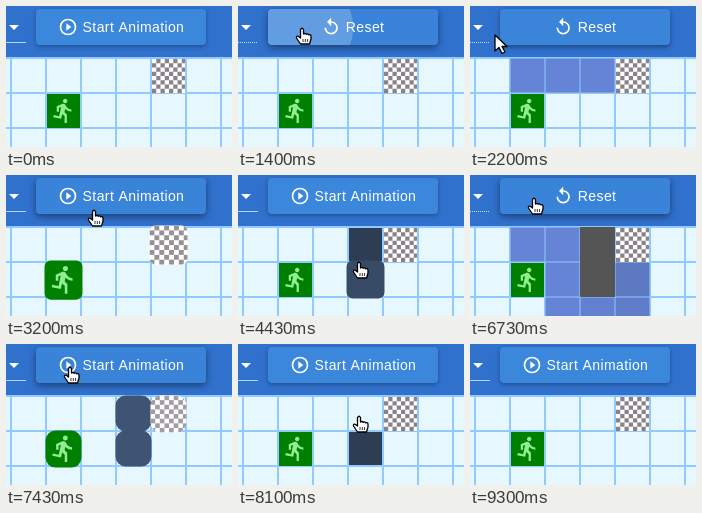
Write an HTML page with a canvas that moves like this. It is 226 px wide and 141 px high and loops after 9.56 s.

```html
<!DOCTYPE html>
<html lang="en">
<head>
<meta charset="utf-8">
<title>Pathfinding grid</title>
<style>
  html, body { margin: 0; width: 100%; height: 100%; overflow: hidden; background: #e6f8fd; }
  canvas { display: block; width: 226px; height: 141px; }
</style>
</head>
<body>
<canvas></canvas>
<script>
const WIDTH = 226, HEIGHT = 141, LOOP = 9560, CELL = 35;
const canvas = document.querySelector('canvas');
const ctx = canvas.getContext('2d');
const ratio = window.devicePixelRatio || 1;
canvas.width = WIDTH * ratio;
canvas.height = HEIGHT * ratio;

const BUTTON = { x: 30, y: 3, w: 170, h: 36 };
const CLICKS = [1340, 2656, 5410, 7078];
const RESETS = [2656, 7078];
const RUNS = [
  { start: 1480, end: 2656, cells: [[1, 0], [2, 0], [3, 0]] },
  { start: 5985, end: 7078, cells: [[1, 0], [2, 0], [2, 1], [2, 2], [3, 2], [4, 2], [4, 1]] },
];
const WALLS = [
  { row: 0, born: 3770, gone: 7930, grow: 360 },
  { row: 1, born: 4230, gone: 8150, grow: 300 },
];
// Pointer stops: time, x, y
const POINTER = [
  [300, -8, 26], [700, 64, 22], [1850, 64, 22], [2200, 25, 29], [2270, 24, 30],
  [2600, 88, 25], [2750, 88, 25], [3200, 88, 35], [3270, 88, 36], [3720, 121, 60],
  [4230, 121, 60], [4400, 121, 87], [4430, 121, 87], [4530, 118, 63], [4670, 118, 63],
  [5070, 64, 23], [7500, 64, 23], [7900, 121, 72], [8100, 121, 72], [8200, 121, 95],
  [8400, 121, 95], [8800, 115, 18], [9100, 115, 18],
];

const icons = {
  play: new Path2D('M10 16.5l6-4.5-6-4.5z'),
  replay: new Path2D('M12 5V1L7 6l5 5V7c3.31 0 6 2.69 6 6s-2.69 6-6 6-6-2.69-6-6H4c0 4.42 3.58 8 8 8s8-3.58 8-8-3.58-8-8-8z'),
  runner: new Path2D('M13.5 5.5c1.1 0 2-.9 2-2s-.9-2-2-2-2 .9-2 2 .9 2 2 2zm-3.6 13.9l1-4.4 2.1 2v6h2v-7.5l-2.1-2 .6-3c1.3 1.5 3.3 2.5 5.5 2.5v-2c-1.9 0-3.5-1-4.3-2.4l-1-1.6c-.4-.6-1-1-1.7-1-.3 0-.5.1-.8.1L6 8.3V13h2V9.6l1.8-.7-1.6 8.1-4.9-1-.4 2z'),
  hand: new Path2D('M-1.5 1.5Q0-1 1.5 1.5V6Q3 4.8 4.2 6.2 5.5 5.2 6.7 6.8 9 6 9 8.5V11L7.5 16H-1.5L-5.5 10Q-6 7.5-3.5 8.5L-1.5 10Z'),
  arrow: new Path2D('M0 0V16L4 12.5 7 18.5 10 17 7 11.5H12Z'),
};

const clamp = v => Math.max(0, Math.min(1, v));
const mix = (a, b, p) => a + (b - a) * p;
const smooth = p => p * p * (3 - 2 * p);
const easeOut = p => 1 - (1 - p) ** 2;
const blend = (a, b, p) => `rgb(${a.map((v, i) => Math.round(mix(v, b[i], p)))})`;

function rect(x, y, w, h, color) {
  ctx.fillStyle = color;
  ctx.fillRect(x, y, w, h);
}

function rounded(x, y, w, h, radius) {
  ctx.beginPath();
  ctx.roundRect(x, y, w, h, radius);
}

function at(x, y, scale, draw) {
  ctx.save();
  ctx.translate(x, y);
  ctx.scale(scale, scale);
  draw();
  ctx.restore();
}

const inCell = (col, row, scale, draw) =>
  at(5 + CELL * (col + .5), 52 + CELL * (row + .5), scale, draw);

// Pop from small and round to a slightly oversized square, then settle.
function pop(p) {
  const scale = p < .6 ? mix(.3, 1.15, easeOut(p / .6))
    : p < .72 ? 1.15 : mix(1.15, 1, (p - .72) / .28);
  return { p, scale, radius: 16.5 * (1 - p) };
}

const lastReset = t => Math.max(-LOOP, ...RESETS.filter(r => r <= t));
const resetPop = t => pop(clamp((t - lastReset(t)) / 800));

function pointerAt(t) {
  const next = POINTER.findIndex(stop => stop[0] > t);
  if (next < 1) return null;
  const [t0, x0, y0] = POINTER[next - 1], [t1, x1, y1] = POINTER[next];
  const p = smooth((t - t0) / (t1 - t0));
  return { x: mix(x0, x1, p), y: mix(y0, y1, p) };
}

const overButton = p => !!p && p.x >= BUTTON.x && p.x <= BUTTON.x + BUTTON.w
  && p.y >= BUTTON.y && p.y <= BUTTON.y + BUTTON.h;

// Average of recent pointer positions gives a 200 ms hover fade.
function hoverAt(t) {
  let hits = 0;
  for (let i = 0; i < 10; i++) hits += overButton(pointerAt(t - i * 20));
  return hits / 10;
}

function drawGrid() {
  rect(0, 51, WIDTH, HEIGHT, '#e6f8fd');
  for (let x = 4; x < WIDTH; x += CELL) rect(x, 51, 2, HEIGHT, '#92caff');
  for (let y = 51; y < HEIGHT; y += CELL) rect(0, y, WIDTH, 2, '#92caff');
}

function drawRun(t, run) {
  if (t < run.start || t >= run.end) return;
  run.cells.forEach(([col, row], i) => {
    const age = t - run.start - i * 30;
    if (age <= 0) return;
    const grow = clamp(age / 350);
    inCell(col, row, grow, () => {
      rounded(-17, -17, 34, 34, 12 * (1 - grow));
      ctx.fillStyle = blend([70, 92, 142], [102, 132, 214], clamp((age - 350) / 300));
      ctx.fill();
    });
  });
}

function drawWall(t, wall, running) {
  if (t < wall.born || t >= wall.gone) return;
  const reset = lastReset(t);
  const { p, scale, radius } = reset > wall.born
    ? resetPop(t) : pop(clamp((t - wall.born) / wall.grow));
  inCell(3, wall.row, running ? 1 : scale, () => {
    const size = running ? 35 : 33;
    rounded(-size / 2, -size / 2, size, size, running ? 0 : radius);
    ctx.fillStyle = running ? '#555' : blend([78, 102, 138], [45, 61, 84], p);
    ctx.fill();
  });
}

function drawEnds(t) {
  const { p, scale, radius } = resetPop(t);
  inCell(1, 1, scale, () => {
    rounded(-16.5, -16.5, 33, 34, radius);
    ctx.fillStyle = '#008000';
    ctx.fill();
    at(-13.5, -13.5, 27 / 24, () => {
      ctx.fillStyle = '#90ee90';
      ctx.fill(icons.runner);
    });
  });
  inCell(4, 0, scale, () => {
    rounded(-16.5, -16.5, 33, 34, radius);
    ctx.clip();
    rect(-17, -17, 35, 35, '#fff');
    const shade = blend([180, 176, 180], [138, 130, 136], p);
    for (let i = 0; i < 64; i++) {
      const col = i % 8, row = i >> 3;
      if ((col + row) % 2) rect(-16.5 + col * 4.25, -16.5 + row * 4.25, 4.25, 4.25, shade);
    }
  });
}

function drawButton(t, running) {
  const { x, y, w, h } = BUTTON, hover = hoverAt(t);
  ctx.save();
  ctx.shadowColor = `rgba(0,0,0,${mix(.32, .45, hover)})`;
  ctx.shadowBlur = mix(4, 7, hover) * ratio;
  ctx.shadowOffsetY = mix(1.5, 2.5, hover) * ratio;
  rounded(x, y, w, h, 4);
  ctx.fillStyle = blend([59, 135, 219], [57, 132, 216], hover);
  ctx.fill();
  ctx.restore();

  ctx.save();
  rounded(x, y, w, h, 4);
  ctx.clip();
  for (const click of CLICKS) {
    const p = (t - click) / 340;
    if (p < 0 || p > 1) continue;
    const origin = pointerAt(click);
    ctx.beginPath();
    ctx.arc(origin.x, origin.y, mix(8, 140, easeOut(p)), 0, 7);
    ctx.fillStyle = `rgba(255,255,255,${.25 * (1 - p)})`;
    ctx.fill();
  }
  ctx.restore();

  const left = running ? 83.2 : 52;
  at(left, 11, 20 / 24, () => {
    ctx.fillStyle = ctx.strokeStyle = '#fff';
    ctx.fill(running ? icons.replay : icons.play);
    if (running) return;
    ctx.lineWidth = 2;
    ctx.beginPath();
    ctx.arc(12, 12, 9, 0, 7);
    ctx.stroke();
  });
  ctx.font = '14px "Liberation Sans", sans-serif';
  ctx.letterSpacing = '0.4px';
  ctx.fillStyle = '#fff';
  ctx.fillText(running ? 'Reset' : 'Start Animation', left + 24.6, 26);
}

function drawHeader(t, running) {
  rect(0, 0, WIDTH, 51, '#3071cd');
  ctx.fillStyle = '#fff';
  ctx.fill(new Path2D('M3 19H13L8 24Z'));
  if (running) for (let x = 0; x < 20; x += 2) rect(x, 36, 1, 1, '#c8daf3');
  else rect(0, 36, 20, 1, '#bcd2f0');
  drawButton(t, running);
}

function drawPointer(t) {
  const p = pointerAt(t);
  if (!p) return;
  const hand = overButton(p) || p.y > 51;
  at(p.x, p.y, 1, () => {
    const shape = hand ? icons.hand : icons.arrow;
    ctx.lineJoin = 'round';
    ctx.lineWidth = 1.3;
    ctx.fillStyle = '#fff';
    ctx.strokeStyle = '#000';
    ctx.fill(shape);
    ctx.stroke(shape);
    if (!hand) return;
    ctx.lineWidth = .8;
    ctx.stroke(new Path2D('M1 11V14M3.3 11V14M5.6 11V14'));
  });
}

function render(t) {
  const running = (t >= CLICKS[0] && t < CLICKS[1]) || (t >= CLICKS[2] && t < CLICKS[3]);
  ctx.setTransform(ratio, 0, 0, ratio, 0, 0);
  drawGrid();
  drawHeader(t, running);
  RUNS.forEach(run => drawRun(t, run));
  WALLS.forEach(wall => drawWall(t, wall, running));
  drawEnds(t);
  drawPointer(t);
}

function tick() {
  render(performance.now() % LOOP);
  requestAnimationFrame(tick);
}
tick();
</script>
</body>
</html>
```
